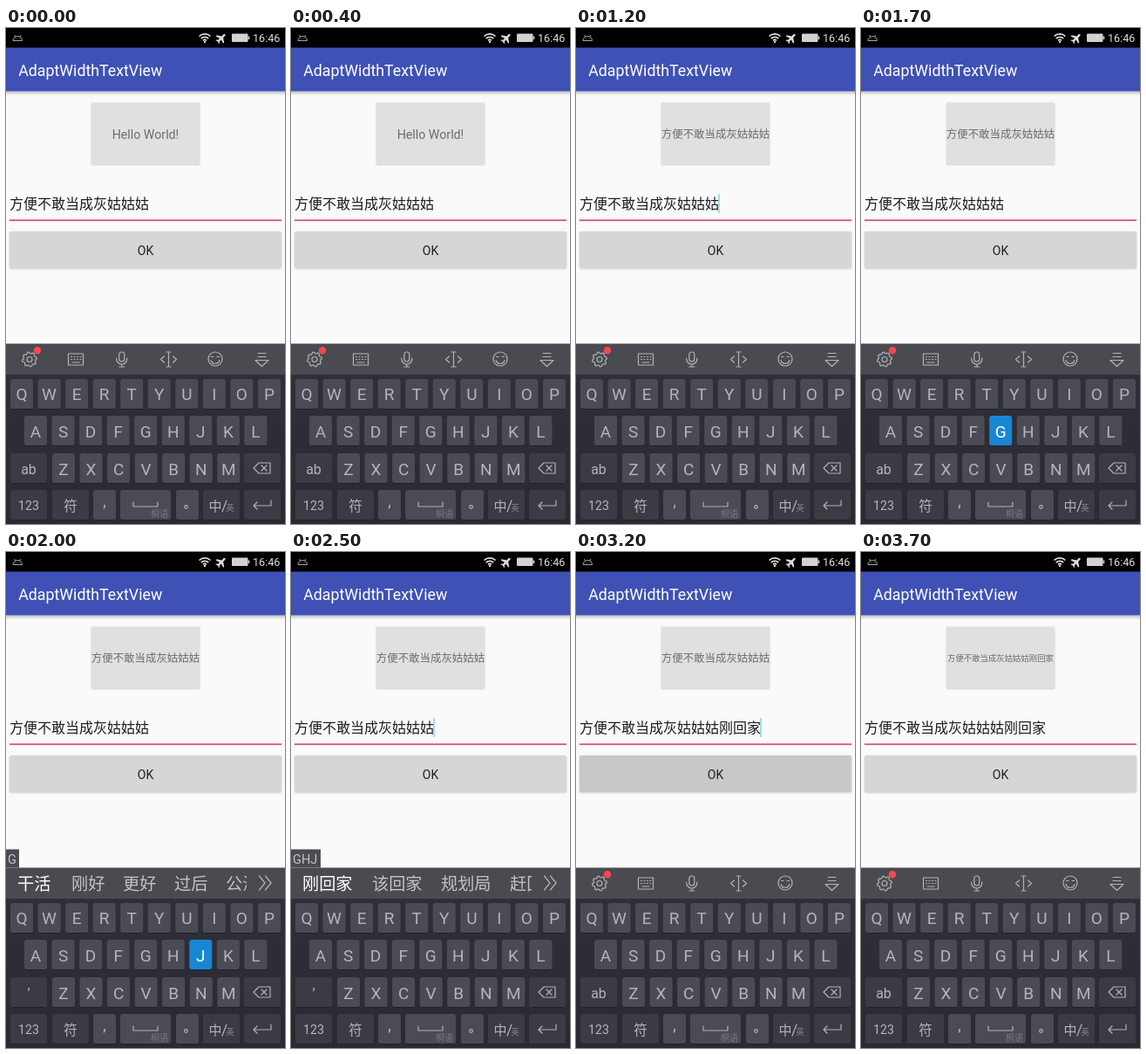
An HTML page that plays this animation: 320 by 568 pixels, repeating every 4.1 s.

```html
<!DOCTYPE html>
<html lang="zh-CN">
<head>
<meta charset="utf-8">
<title>AdaptWidthTextView</title>
<style>
html, body { margin: 0; width: 100%; height: 100%; overflow: hidden; background: #fafafa; }
svg { display: block; width: 320px; height: 568px; }
text { font-family: Roboto, "Noto Sans CJK SC", "Noto Sans CJK", sans-serif; }
.icon { fill: none; stroke: #b2b2b8; stroke-width: 1.2; stroke-linecap: round; stroke-linejoin: round; }
</style>
</head>
<body>
<svg id="stage" viewBox="0 0 320 568">
  <defs>
    <linearGradient id="shade" x2="0" y2="1">
      <stop stop-color="#000" stop-opacity=".22"/>
      <stop offset="1" stop-color="#000" stop-opacity="0"/>
    </linearGradient>
    <linearGradient id="floor" x2="0" y2="1">
      <stop stop-color="#302f39"/>
      <stop offset="1" stop-color="#2b2a34"/>
    </linearGradient>
    <filter id="soft" x="-10%" y="-10%" width="120%" height="125%">
      <feDropShadow dx="0" dy=".8" stdDeviation=".8" flood-opacity=".2"/>
    </filter>
    <clipPath id="bar"><rect x="0" y="361" width="276" height="36"/></clipPath>
  </defs>
  <rect width="320" height="568" fill="#fafafa"/>
  <rect y="72.500" width="320" height="5" fill="url(#shade)"/>
  <rect y="22" width="320" height="50.500" fill="#3f51b5"/>
  <rect width="320" height="22.500" fill="#000"/>

  <g fill="none" stroke="#a8a8a8">
    <path d="M8 14.500a5 4.800 0 0 1 10.500 0zM9.500 8l1.300 2M17 8l-1.300 2"/>
    <path d="M11.300 12.300h.6M14.700 12.300h.6"/>
  </g>
  <g fill="none" stroke="#e0e0e0" stroke-width="1.700">
    <path d="M221.500 9.500a9.500 9.500 0 0 1 13 0M223.800 12a6.200 6.200 0 0 1 8.400 0M226 14.300a3 3 0 0 1 4 0"/>
  </g>
  <circle cx="228" cy="16" r="1.200" fill="#ddd"/>
  <path d="M0-6.500L1.200-5V-1.800L6 1.500V3L1.200 1.500V4.300L2.800 5.700V6.600L0 5.800L-2.800 6.600V5.700L-1.200 4.300V1.500L-6 3V1.500L-1.200-1.800V-5Z" transform="translate(247 11.500) rotate(45)" fill="#ddd"/>
  <rect x="259" y="6.500" width="18.500" height="9.500" rx="1" fill="#d2d2d2"/>
  <rect x="277.500" y="9.500" width="1.800" height="3.500" fill="#ccc"/>

  <rect x="98" y="85.500" width="124" height="70.500" fill="#dfe1df" filter="url(#soft)"/>
  <rect x="4" y="219.300" width="312" height="1.800" fill="#d4558a"/>
  <rect id="ok" x="4" y="233" width="312" height="42" rx="2" filter="url(#soft)"/>
  <rect y="361.500" width="320" height="36" fill="#4a4a51"/>
  <rect y="397" width="320" height="171" fill="url(#floor)"/>
</svg>
<script>
const LOOP = 4100;
const stage = document.getElementById('stage');
const ok = document.getElementById('ok');

function add(tag, attrs, parent = stage) {
  const el = document.createElementNS('http://www.w3.org/2000/svg', tag);
  for (const k in attrs) el.setAttribute(k, attrs[k]);
  parent.append(el);
  return el;
}
function label(str, x, y, size, fill, more = {}, parent = stage) {
  const el = add('text', { x, y, 'font-size': size, fill, ...more }, parent);
  el.textContent = str;
  return el;
}
const mid = { 'text-anchor': 'middle' };
const icon = (d, parent = stage) => add('path', { d, class: 'icon' }, parent);

label('16:46', 283, 15.8, 12.6, '#ddd');
label('AdaptWidthTextView', 14.2, 54.5, 17.8, '#fff');
label('OK', 160, 260, 14, '#202020', mid);
const view = label('', 160, 126, 14.2, '#6c6c6c', { ...mid, 'font-weight': 400 });
const field = label('', 4, 206.8, 16, '#1c1c1c', { 'font-weight': 500 });
const caret = add('rect', { x: 163.5, y: 190, width: 1, height: 22, fill: '#4cc5c8' });

// Keyboard
const keys = {};
function key(name, x, y, w = 26, text = name, size = 19, dark = false) {
  const box = add('rect', { x, y, width: w, height: 34, rx: 3, fill: dark ? '#3b3b44' : '#4a4b54' });
  add('path', { d: `M${x + 2} ${y + 34.5}h${w - 4}`, stroke: '#202028' });
  const drop = y > 402 ? 18.2 : 17;
  const cap = label(text, x + w / 2, y + drop + size * 0.36, size, '#b4b4ba', mid);
  keys[name] = { box, cap };
}
const row = (letters, x, y) =>
  [...letters].forEach((c, i) => key(c, x + i * 31.55, y));
row('QWERTYUIOP', 5, 402);
row('ASDFGHJKL', 21, 444);
row('ZXCVBNM', 53, 487);
key('ab', 5, 487, 42, 'ab', 16, true);
key('del', 273, 487, 42, '', 16, true);
key('123', 5, 529, 42, '123', 14.2, true);
key('sym', 53, 529, 42, '符', 15.5, true);
key('comma', 100, 529, 26, '', 16);
key('space', 131, 529, 58, '');
key('stop', 195, 529, 26, '', 16);
key('lang', 226, 529, 42, '', 16, true);
key('enter', 273, 529, 42, '', 16, true);

label(',', 113, 548, 18, '#b4b4ba', mid);
add('circle', { cx: 206.5, cy: 548.5, r: 1.8, class: 'icon' });
icon('M146 543v5h28v-5');
label('桐语', 166, 559.5, 10, '#77777f');
label('中', 240, 552.6, 15, '#b4b4ba', mid);
icon('M248 554l5-13').setAttribute('stroke', '#77777f');
label('英', 257, 553, 9.5, '#85858c', mid);
icon('M284 504l6-6h13v12h-13zM293 501l6 6M299 501l-6 6');
icon('M304 541v6h-20M288 543l-4 4l4 4');

// Tool strip
const tools = add('g', {});
const gear = Array.from({ length: 32 }, (_, i) => {
  const a = (i - 1.5) * Math.PI / 16, r = i % 4 < 2 ? 8.4 : 6.8;
  return `${(27 + r * Math.cos(a)).toFixed(1)} ${(379.5 + r * Math.sin(a)).toFixed(1)}`;
});
icon(`M${gear.join('L')}Z`, tools);
add('circle', { cx: 27, cy: 379.5, r: 3, class: 'icon' }, tools);
add('circle', { cx: 36, cy: 369.3, r: 4.2, fill: '#f4484f' }, tools);
icon('M71.500 373h17v13h-17zM74.500 376.500h1M78 376.500h1M81.500 376.500h1M85 376.500h1M74.500 379.500h1M78 379.500h1M81.500 379.500h1M85 379.500h1M76 383h8', tools);
add('rect', { x: 129.8, y: 371, width: 6, height: 11, rx: 3, class: 'icon' }, tools);
icon('M126.800 378v1a6 6 0 0 0 12 0v-1M132.800 385v3M129.800 388h6', tools);
icon('M186.500 371v17M184 371h5M184 388h5M181.500 376l-4 3.500l4 3.500M191.500 376l4 3.500l-4 3.500', tools);
add('circle', { cx: 240, cy: 379, r: 8, class: 'icon' }, tools);
icon('M235.500 376.500h2.500M242 376.500h2.500M235 380.500a5.200 5.200 0 0 0 10 0', tools);
icon('M289 372.500h9M289 376.500h9M286 380.500h15l-7.500 7z', tools);

// Candidate strip
const picks = add('g', {});
const words = add('g', { 'clip-path': 'url(#bar)' }, picks);
const slots = Array.from({ length: 5 }, (_, i) =>
  label('', 0, 387.3, 19.2, i ? '#c2c2c7' : '#fff', { 'font-weight': i ? 400 : 500 }, words));
icon('M290.500 371l6.500 8l-6.500 8M297.500 371l6.500 8l-6.500 8', picks);
const tag = add('rect', { x: 0, y: 340.5, height: 21, fill: '#4b4b52' }, picks);
const typed = label('', 2, 356.5, 14.5, '#c4c4c9', {}, picks);

const GH = { list: ['干活', '刚好', '更好', '过后', '公海'], at: [13, 75, 134, 193, 252] };
const GHJ = { list: ['刚回家', '该回家', '规划局', '赶回家'], at: [13, 93, 172, 251] };

// Each track: [start ms, value]
const base = '方便不敢当成灰姑姑姑', full = base + '刚回家';
const tracks = {
  view: [[0, ['Hello World!', 14.2]], [1100, [base, 12.44]], [3500, [full, 9.4]]],
  field: [[0, base], [2800, full]],
  caret: [[0, 0], [100, 1], [400, 0], [1000, 1], [1400, 0], [2400, 1], [2900, 0], [3100, 1], [3600, 0]],
  ok: [[0, '#d6d6d6'], [800, '#c8c8c8'], [900, '#bbbbbb'], [1100, '#c8c8c8'], [1200, '#d6d6d6'],
       [3200, '#c8c8c8'], [3300, '#bbbbbb'], [3500, '#c8c8c8'], [3600, '#d6d6d6']],
  down: [[0, ''], [1700, 'G'], [1800, ''], [1850, 'H'], [1950, ''], [2000, 'J'], [2100, '']],
  typed: [[0, ''], [1900, 'G'], [2100, 'GH'], [2200, 'GHJ'], [2800, '']],
  words: [[0, GH], [2200, GHJ]]
};
const at = (name, t) => tracks[name].findLast(s => s[0] <= t)[1];

function draw(now) {
  const t = now % LOOP;
  const [str, size] = at('view', t);
  view.textContent = str;
  view.setAttribute('font-size', size);
  view.setAttribute('y', 121.8 + size * 0.36);

  const text = at('field', t);
  field.textContent = text;
  caret.setAttribute('x', 3.5 + text.length * 16);
  caret.setAttribute('opacity', at('caret', t));
  ok.setAttribute('fill', at('ok', t));

  const down = at('down', t);
  for (const c of 'GHJ') {
    keys[c].box.setAttribute('fill', c === down ? '#1787d4' : '#4a4b54');
    keys[c].cap.setAttribute('fill', c === down ? '#fff' : '#b4b4ba');
  }

  const input = at('typed', t);
  tools.setAttribute('visibility', input ? 'hidden' : 'visible');
  picks.setAttribute('visibility', input ? 'visible' : 'hidden');
  keys.ab.cap.textContent = input ? '’' : 'ab';
  typed.textContent = input;
  tag.setAttribute('width', [0, 15, 24, 34][input.length]);
  const { list, at: xs } = at('words', t);
  slots.forEach((el, i) => {
    el.textContent = list[i] || '';
    el.setAttribute('x', xs[i] || 0);
  });
}
function tick() {
  draw(performance.now());
  requestAnimationFrame(tick);
}
tick();
</script>
</body>
</html>
```
